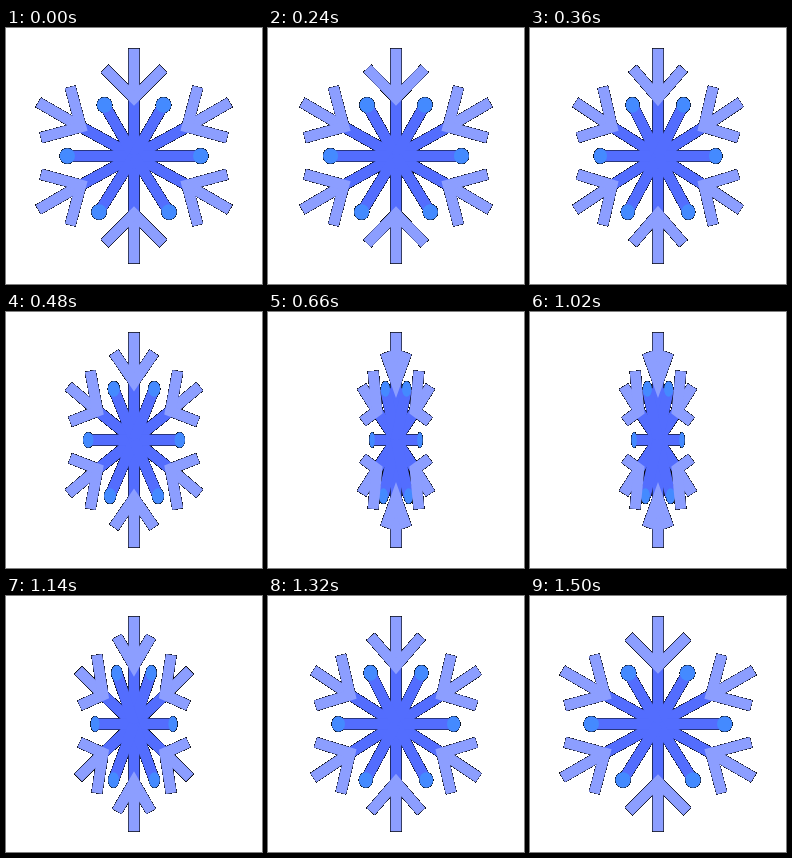
Recreate the animation shown at these times as an HTML page with a canvas. Size 256 by 256 pixels, loop 1680 ms.

```html
<!DOCTYPE html>
<html lang="en">
<head>
<meta charset="utf-8">
<title>Turning snowflake</title>
<style>
  html, body { margin: 0; width: 100%; height: 100%; overflow: hidden; background: #fff; }
  canvas { display: block; width: 100%; height: 100%; }
</style>
</head>
<body>
<canvas id="stage" width="256" height="256"></canvas>
<script>
const SIZE = 256;
const ctx = document.getElementById('stage').getContext('2d', { willReadFrequently: true });

const LOOP = 1680, STEP = 60, START = 180, TURN = 1320;
const CORE = '#536dfe', TIP = '#8c9eff', DOT = '#448aff';
const SPREAD = 2.8, RADIUS = 7.7;

// Dot centres, relative to the middle of the flake
const DOTS = [[-66.7, 0], [66.7, 0], [-29.5, -51], [29.5, -51], [-35, 56], [35, 56]];

// Symmetric ease, the same as cubic-bezier(.25, 0, .75, 1)
function ease(x) {
  let lo = 0, hi = 1;
  for (let i = 0; i < 24; i++) {
    const t = (lo + hi) / 2, u = 1 - t;
    if (0.75 * t * u * u + 2.25 * t * t * u + t * t * t < x) lo = t;
    else hi = t;
  }
  return lo * lo * (3 - 2 * lo);
}

// Turns a point onto branch k; the side branches sit a little further out
function place([x, y], k) {
  const a = k * Math.PI / 3, c = Math.cos(a), s = Math.sin(a);
  return [x * c - y * s + SPREAD * Math.round(s), x * s + y * c];
}

// Only the points are squeezed, so the strokes keep their weight
function line(points, sx, color) {
  ctx.strokeStyle = color;
  ctx.beginPath();
  for (const [x, y] of points) ctx.lineTo(x * sx, y);
  ctx.stroke();
}

function flake(sx) {
  ctx.lineWidth = 10.8;
  ctx.miterLimit = 4;

  for (let k = 0; k < 6; k++) line([[0, 0], place([0, -60], k)], sx, CORE);
  for (const dot of DOTS) line([[0, 0], dot], sx, CORE);

  ctx.fillStyle = DOT;
  for (const [x, y] of DOTS) {
    // Slanted dots flatten less than the level ones
    const flat = y ? Math.sqrt(0.25 + 0.75 * sx * sx) : Math.abs(sx);
    ctx.beginPath();
    ctx.ellipse(x * sx, y, RADIUS * flat, RADIUS, 0, 0, 2 * Math.PI);
    ctx.fill();
  }

  for (let k = 0; k < 6; k++) {
    const turn = p => place(p, k);
    line([[0, -58], [0, -107.3]].map(turn), sx, TIP);
    line([[-29.3, -87.4], [0, -58], [29.3, -87.4]].map(turn), sx, TIP);
  }
}

// Blends soft edge pixels into black, which gives the thin hard outline
function hardenEdges() {
  const image = ctx.getImageData(0, 0, SIZE, SIZE), px = image.data;
  for (let i = 0; i < px.length; i += 4) {
    const a = px[i + 3] / 255;
    for (let c = 0; c < 3; c++) px[i + c] *= a;
    px[i + 3] = a > 0.04 ? 255 : 0;
  }
  ctx.putImageData(image, 0, 0);
}

function draw(t) {
  const x = Math.min(1, Math.max(0, (t - START) / TURN));
  ctx.setTransform(1, 0, 0, 1, 0, 0);
  ctx.clearRect(0, 0, SIZE, SIZE);
  ctx.translate(SIZE / 2, SIZE / 2);
  flake(1 - 2 * ease(x));
  hardenEdges();
}

let shown = -1;
function tick() {
  const t = Math.floor((performance.now() % LOOP) / STEP) * STEP;
  if (t !== shown) draw(shown = t);
  requestAnimationFrame(tick);
}
tick();
</script>
</body>
</html>
```
